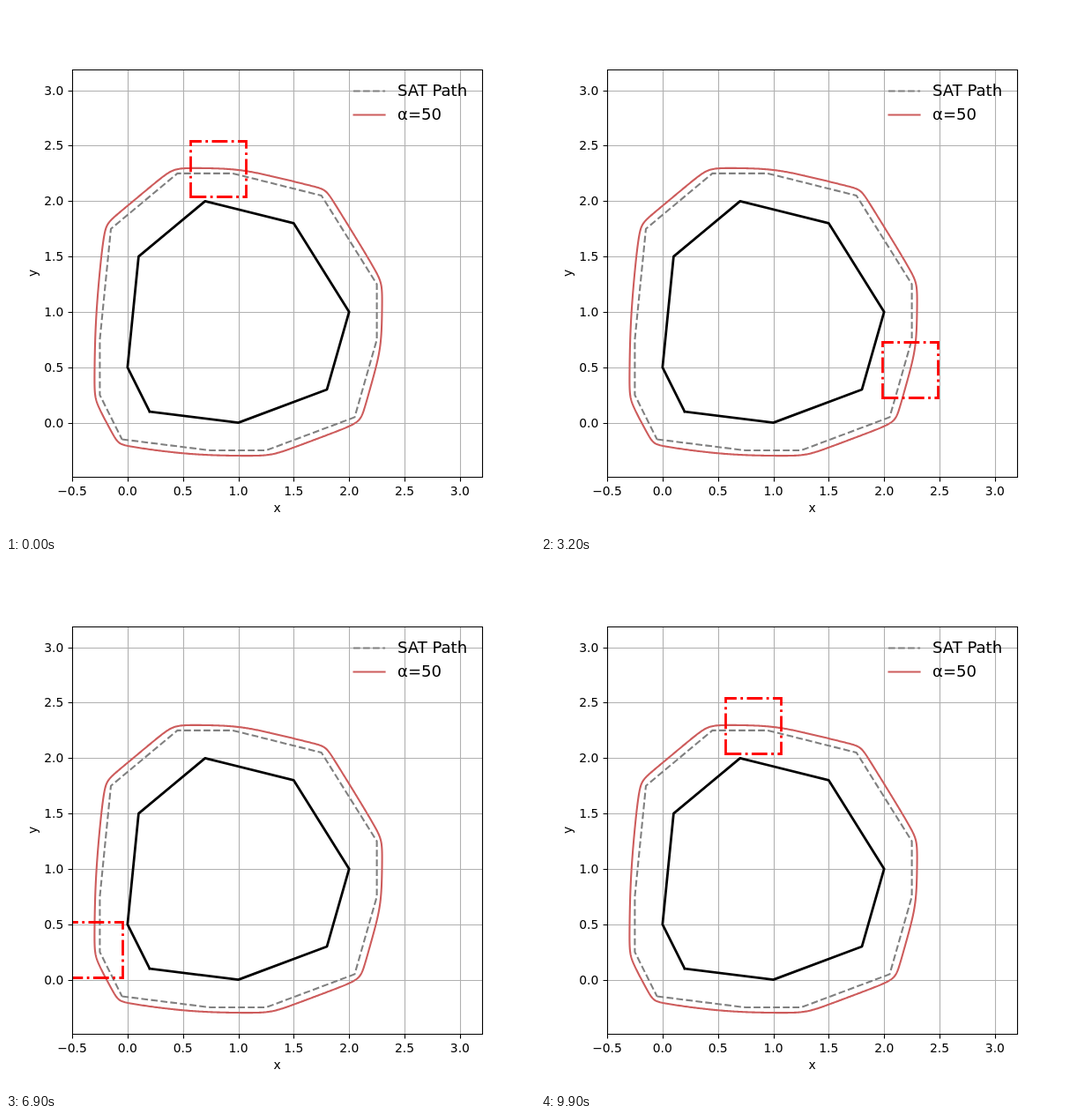
An HTML page that plays this animation: 600 by 600 pixels, repeating every 10 s.

```html
<!DOCTYPE html>
<html lang="en">
<head>
<meta charset="utf-8">
<title>Smoothed separating-axis path</title>
<style>
  html, body { margin: 0; width: 100%; height: 100%; overflow: hidden; background: #fff; }
  svg { display: block; width: 600px; height: 600px; }
  path { fill: none; }
  text { font: 13.89px "DejaVu Sans", sans-serif; fill: #000; text-anchor: middle; }
  .grid { stroke: #b0b0b0; stroke-width: 1.11; }
  .axis { stroke: #000; stroke-width: 1.11; }
  .body { stroke: #000; stroke-width: 2.78; stroke-linecap: square; stroke-linejoin: round; }
  .sat { stroke: #808080; stroke-width: 2.083; stroke-dasharray: 7.708 3.333; stroke-linejoin: round; }
  .smooth { stroke: #cd5c5c; stroke-width: 2.083; stroke-linejoin: round; }
  .box { stroke: #f00; stroke-width: 2.78; stroke-dasharray: 17.78 4.44 2.78 4.44; }
  text.tick { text-anchor: end; }
  text.key { font-size: 18.06px; text-anchor: start; }
</style>
</head>
<body>
<svg viewBox="0 0 600 600">
  <defs><clipPath id="area"><rect x="75" y="72" width="465" height="462"/></clipPath></defs>
  <path class="grid" id="grid"/>
  <g clip-path="url(#area)">
    <path class="body" id="body"/>
    <path class="sat" id="sat"/>
    <path class="smooth" id="smooth"/>
    <path class="box" id="box"/>
  </g>
  <path class="axis" id="ticks"/>
  <path class="axis" d="M75.5 72.5H540.5V534.5H75.5Z"/>
  <g id="labels"></g>
  <text x="307.5" y="574">x</text>
  <text transform="translate(34.5 303) rotate(-90)">y</text>
  <path class="sat" d="M394 96.5H430.1"/>
  <path class="smooth" d="M393.5 123.5H430.6"/>
  <text class="key" x="444" y="102">SAT Path</text>
  <text class="key" x="444" y="129">α=50</text>
</svg>
<script>
const SCALE = 465 / 3.7, HALF = 0.25, ALPHA = 50;
const FRAMES = 100, FRAME_MS = 100;
const el = id => document.getElementById(id);
const px = x => 75 + (x + 0.5) * SCALE;
const py = y => 303 - (y - 1.35) * SCALE;
const snap = v => Math.floor(v + 0.5) + 0.5;
const line = pts => "M" + pts.map(([x, y]) => px(x).toFixed(2) + " " + py(y).toFixed(2)).join("L");

// Axes
let grid = "", ticks = "";
function label(text, x, y, cls) {
  const node = document.createElementNS("http://www.w3.org/2000/svg", "text");
  node.setAttribute("x", x);
  node.setAttribute("y", y);
  if (cls) node.setAttribute("class", cls);
  node.textContent = text;
  el("labels").append(node);
}
for (let v = -0.5; v <= 3; v += 0.5) {
  const x = snap(px(v)), y = snap(py(v));
  ticks += `M${x} 534.5V539.4`;
  label(v.toFixed(1).replace("-", "\u2212"), px(v), 555);
  if (v < 0) continue;
  grid += `M${x} 72V534M75 ${y}H540`;
  ticks += `M75.5 ${y}H70.6`;
  label(v.toFixed(1), 65.3, Math.round(py(v) + 5), "tick");
}
el("grid").setAttribute("d", grid);
el("ticks").setAttribute("d", ticks);

// Obstacle and its exact sum with the square
const shape = [[0.2, 0.1], [1, 0], [1.8, 0.3], [2, 1], [1.5, 1.8], [0.7, 2], [0.1, 1.5], [0, 0.5]];
const sum = [[-0.05, -0.15], [0.75, -0.25], [1.25, -0.25], [2.05, 0.05], [2.25, 0.75], [2.25, 1.25],
  [1.75, 2.05], [0.95, 2.25], [0.45, 2.25], [-0.15, 1.75], [-0.25, 0.75], [-0.25, 0.25]];
el("body").setAttribute("d", line([...shape, shape[0]]));
el("sat").setAttribute("d", line([...sum, sum[0]]));

// Separating axes: normals of both shapes, each in both directions
const normals = shape.map(([x, y], i) => {
  const [u, v] = shape[(i + 1) % shape.length];
  const len = Math.hypot(u - x, v - y);
  return [(v - y) / len, (x - u) / len];
}).concat([[1, 0], [0, 1], [-1, 0], [0, -1]]);
const planes = normals.flatMap(([a, b]) => [[a, b], [-a, -b]]).map(([a, b]) => [
  a, b, Math.max(...shape.map(([x, y]) => a * x + b * y)) + HALF * (Math.abs(a) + Math.abs(b))
]);
const outside = (x, y) =>
  planes.reduce((s, [a, b, d]) => s + Math.exp(ALPHA * (a * x + b * y - d)), 0) > planes.length;

// Zero level of the smooth maximum, clockwise from the top
function pointAt(angle) {
  const c = Math.cos(angle), s = Math.sin(angle);
  let lo = 0.5, hi = 2.5;
  for (let i = 0; i < 36; i++) {
    const r = (lo + hi) / 2;
    if (outside(1 + r * c, 1 + r * s)) hi = r; else lo = r;
  }
  return [1 + lo * c, 1 + lo * s];
}
const STEPS = 900, start = Math.atan2(1.294, -0.183);
const path = Array.from({ length: STEPS + 1 }, (_, i) => pointAt(start - 2 * Math.PI * i / STEPS));
el("smooth").setAttribute("d", line(path));

// The square advances evenly in |dx| + |dy|
const travel = [0];
for (let i = 1; i <= STEPS; i++) {
  travel[i] = travel[i - 1] + Math.abs(path[i][0] - path[i - 1][0]) + Math.abs(path[i][1] - path[i - 1][1]);
}
function along(part) {
  const goal = part * travel[STEPS];
  let i = 1;
  while (i < STEPS && travel[i] < goal) i++;
  const k = (goal - travel[i - 1]) / (travel[i] - travel[i - 1]);
  return [0, 1].map(j => path[i - 1][j] + k * (path[i][j] - path[i - 1][j]));
}

function draw(frame) {
  const [x, y] = along(frame / (FRAMES - 1));
  const l = snap(px(x - HALF)), r = snap(px(x + HALF));
  const t = snap(py(y + HALF)), b = snap(py(y - HALF));
  el("box").setAttribute("d", `M${l} ${b}H${r}V${t}H${l}Z`);
}

const begin = performance.now();
let shown = -1;
function tick() {
  const frame = Math.floor((performance.now() - begin) / FRAME_MS) % FRAMES;
  if (frame !== shown) draw(shown = frame);
  requestAnimationFrame(tick);
}
tick();
</script>
</body>
</html>
```
